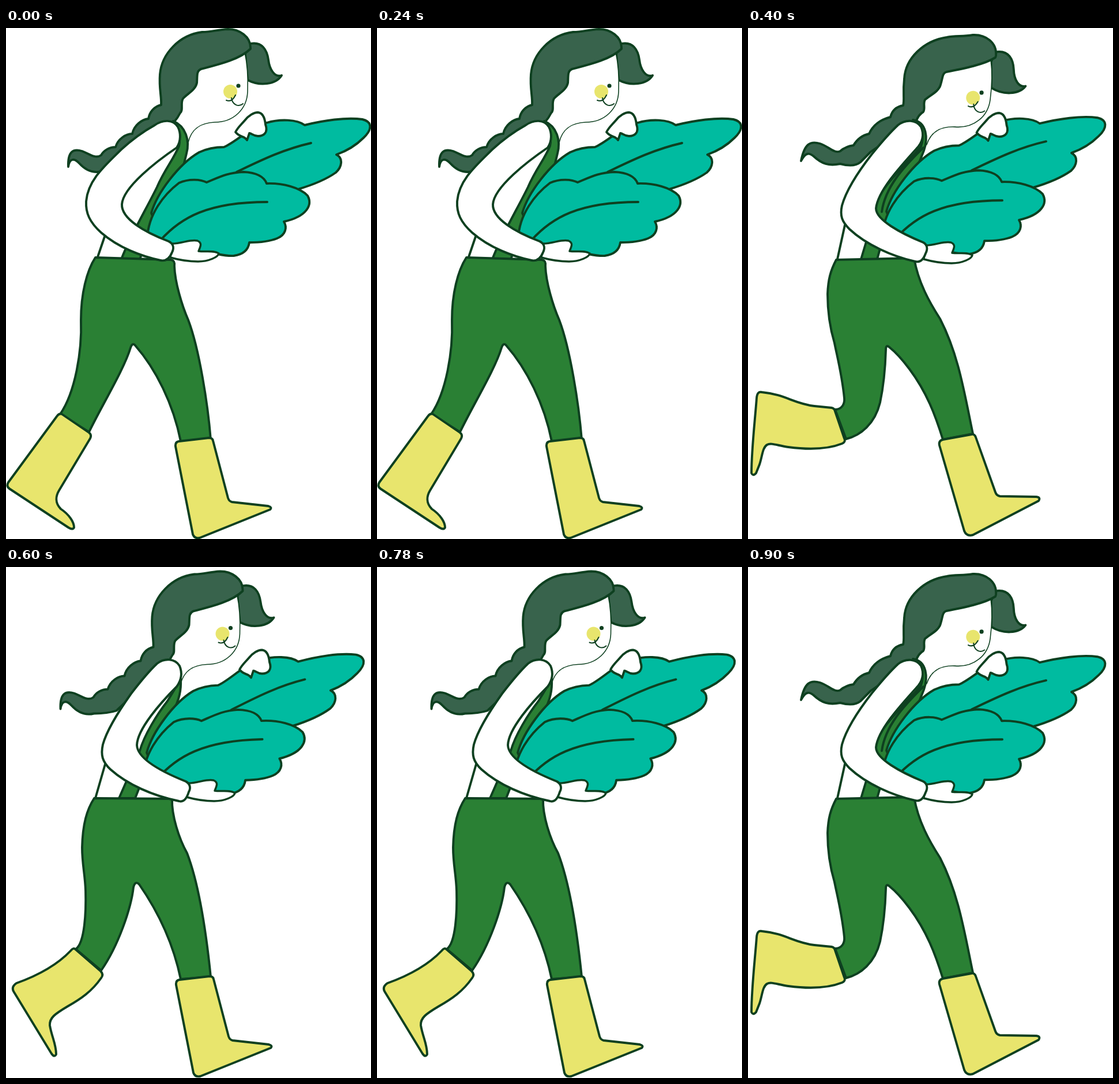
Recreate the animation shown at these times as an HTML page with a canvas. Size 633x884 px, loop 1100 ms.

```html
<!DOCTYPE html>
<html lang="en">
<head>
<meta charset="utf-8">
<title>Harvest walk</title>
<style>
html, body { margin: 0; width: 100%; height: 100%; overflow: hidden; background: #fff; }
canvas { display: block; width: 633px; height: 884px; }
</style>
</head>
<body>
<canvas id="stage" width="633" height="884"></canvas>
<script>
const ctx = document.getElementById('stage').getContext('2d');
const INK = '#0e4020', HAIR = '#38634c', GREEN = '#2a8034',
      LEAF = '#00bba0', YELLOW = '#e8e56d', WHITE = '#fff';

// Parts shared by every pose
const tail = 'M420 28 C445 21 453 40 455 55 C457 72 466 86 478 82 C468 98 440 101 419 90 L415 45 Z';
const face = 'M414 42 C418 60 420 85 419 110 C418 140 395 163 362 163 C340 164 322 172 316 198';
const nose = 'M382 125 Q392 129 398 116';
const smile = 'M391 121 C393 134 404 137 411 131';
const backLeaf = 'M252 320 C262 285 300 235 335 215 C350 208 365 206 378 206 C398 198 425 170 452 164 ' +
  'C475 157 505 158 518 168 C550 160 590 154 618 158 C635 162 636 175 620 190 C605 205 590 213 573 219 ' +
  'C585 225 583 240 572 250 C555 262 530 272 506 279 L400 300 L260 340 Z';
const backVein = 'M400 249 C440 230 480 210 529 199';
const frontLeaf = 'M245 365 C246 322 275 287 300 268 C318 260 338 262 348 267 C370 258 385 250 412 249 ' +
  'C435 250 448 258 452 269 C480 268 510 276 523 290 C532 306 522 326 482 335 C488 345 485 358 470 364 ' +
  'C455 370 437 371 422 371 C420 385 410 392 395 394 C380 395 365 390 355 389 L280 380 Z';
const frontVein = 'M268 367 C303 328 350 301 453 301';
const farHand = 'M398 180 C402 172 408 167 414 160 C421 151 430 146 437 146 C446 147 449 157 450 167 ' +
  'C455 181 447 187 437 187 C429 187 426 182 422 182 L418 194 C413 186 406 190 398 180 Z';
const nearHand = 'M288 373 C305 373 320 365 332 368 C341 372 337 378 334 386 C345 388 360 384 369 390 ' +
  'C368 396 352 404 333 404 C315 404 303 402 285 397 Z';

const hairLevel = 'M424 34 C424 15 405 2 385 2 C365 3 358 7 340 7 C300 12 270 45 267 80 ' +
  'C265 105 270 118 269 133 C257 136 249 145 247 157 C236 158 222 168 219 183 C208 183 194 192 190 206 ' +
  'C180 206 170 211 165 220 C155 227 145 218 132 213 C115 208 107 215 108 240 C110 226 118 224 127 234 ' +
  'C138 246 150 252 166 248 C182 248 196 246 205 243 L292 162 Q298 155 302 147 C308 142 302 130 307 122 ' +
  'C315 113 328 108 331 95 C332 82 330 75 338 71 C365 64 405 55 424 36 Z';
const hairTilted = 'M430 48 C432 25 412 11 390 12 C372 15 360 13 345 16 C305 22 273 52 271 88 ' +
  'C268 115 272 122 269 134 C258 136 250 142 247 154 C236 157 219 163 210 183 C201 185 190 191 183 203 ' +
  'C175 204 167 207 160 213 C150 218 140 205 125 200 C108 195 98 200 92 230 C100 214 107 216 114 222 ' +
  'C128 235 140 239 160 235 C175 239 188 238 195 232 L213 214 L292 160 Q296 150 304 145 ' +
  'C308 139 303 131 307 124 C316 116 331 110 334 98 C338 85 337 78 344 76 C375 70 410 63 429 51 Z';
const frontBoot = 'M300 715 L352 709 Q358 709 359 714 L385 813 Q387 819 392 820 L455 827 ' +
  'Q462 829 458 833 L336 882 Q327 884 324 876 L294 724 Q293 716 300 715 Z';

const stride = {
  head: [0, 0, 0], hairAt: [0, 0], hair: hairLevel,
  leavesAt: [0, 0], farAt: [0, 0], nearAt: [0, 0], bootAt: [0, 0],
  torso: 'M172 358 L158 399',
  strap: 'M290 161 C312 170 319 195 313 217 L304 254 L264 320 C246 350 240 380 232 400 L200 400 ' +
    'C215 360 245 310 262 275 C275 245 292 225 300 204 C303 190 300 172 290 161 Z',
  arm: 'M258 168 C272 158 290 158 298 171 C303 181 304 195 296 207 C262 230 203 275 201 305 ' +
    'C200 330 240 353 282 369 C290 373 292 380 288 388 C284 398 278 404 268 402 C235 395 195 380 165 354 ' +
    'C145 336 138 320 139 300 C142 262 175 235 200 210 C222 190 240 178 258 168 Z',
  pants: 'M155 397 L286 401 C291 402 293 405 292 412 C293 440 305 480 316 505 C335 555 350 650 355 712 ' +
    'L303 715 C290 650 260 590 224 549 C221 545 218 547 216 553 C205 590 165 655 144 699 L94 668 ' +
    'C120 630 132 560 130 505 C130 460 140 420 155 397 Z',
  backBoot: 'M97 668 L144 700 Q149 704 146 710 L92 800 C86 810 85 822 95 832 C110 842 118 855 118 864 ' +
    'Q116 869 108 864 L6 797 Q0 793 4 786 L88 672 Q92 666 97 668 Z',
  frontBoot
};

const run = {
  head: [12.3, -22.8, 5], hairAt: [0, 0], hair: hairTilted,
  leavesAt: [-12, -2.8], farAt: [-1.5, 1], nearAt: [20, 3], bootAt: [0, 0],
  torso: 'M168 341 L155 400',
  strap: 'M286 159 C311 163 312 192 305 212 L290 250 L246 320 L224 400 L196 400 L208 360 L215 320 ' +
    'C222 280 285 225 300 205 C306 190 302 170 286 159 Z',
  seam: 'M304 207 C270 240 238 275 232 318',
  arm: 'M260 168 C274 157 292 159 300 171 C306 184 303 198 292 209 C262 242 225 283 222 312 ' +
    'C222 332 265 355 304 371 C311 375 312 382 308 390 C304 401 299 406 290 404 C250 395 205 375 176 348 ' +
    'C163 335 159 325 163 307 C170 282 190 250 215 218 C232 197 245 182 260 168 Z',
  pants: 'M153 401 L288 398 C295 440 315 475 333 503 C365 565 375 630 390 702 L338 712 ' +
    'C325 670 310 630 280 590 C265 570 255 560 245 552 Q239 547 239 557 C238 590 236 615 229 648 ' +
    'C220 685 195 705 170 711 L151 660 C163 660 168 650 167 640 C163 600 155 570 150 545 ' +
    'C141 515 138 490 138 460 C139 435 143 420 153 401 Z',
  backBoot: 'M24 630 C65 634 80 650 115 654 L145 657 Q150 658 151 663 L167 710 Q170 716 163 719 ' +
    'C135 730 100 729 70 725 C50 722 40 717 33 721 C25 726 25 740 20 755 L14 770 Q9 776 6 770 ' +
    'C6 730 12 680 15 640 Q16 628 24 630 Z',
  frontBoot: 'M338 712 L388 703 Q393 702 395 708 L429 803 Q431 809 437 810 L500 811 Q508 812 504 818 ' +
    'L390 877 Q379 880 375 870 L332 722 Q330 714 338 712 Z'
};

const step = {
  head: [-13.5, 5.5, 0], hairAt: [-13.5, 5.5], hair: hairLevel,
  leavesAt: [-14.6, 6.6, -1.2], farAt: [7, -2.5], nearAt: [28, 1], bootAt: [1, -1],
  torso: 'M172 341 L155 400',
  strap: 'M303 194 C304 212 301 228 290 250 L256 318 L224 400 L196 400 L232 318 ' +
    'C240 290 262 255 280 232 Z',
  arm: 'M262 167 C275 157 293 158 301 171 C306 183 304 196 296 207 C268 235 228 280 227 308 ' +
    'C228 333 272 355 312 371 C319 375 321 382 317 389 C313 402 307 407 300 405 C255 396 210 376 181 350 ' +
    'C167 337 164 325 168 307 C175 282 195 250 217 219 C234 197 247 181 262 167 Z',
  pants: 'M153 400 L288 401 C287 430 300 470 314 495 C335 550 348 640 355 709 L303 713 ' +
    'C292 660 270 605 231 549 Q224 542 221 554 C217 590 195 655 165 698 L121 661 ' +
    'C137 650 139 595 138 560 C137 530 132 515 132 485 C133 445 140 420 153 400 Z',
  backBoot: 'M120 661 L164 699 Q170 705 165 711 C149 734 130 747 107 760 C85 773 75 780 76 793 ' +
    'C79 812 87 825 87 843 Q84 849 79 842 L13 734 Q9 726 18 720 C60 705 90 687 112 664 Q117 658 120 661 Z',
  frontBoot
};

function shape(d, fill, width = 3.9) {
  const path = new Path2D(d);
  if (fill) {
    ctx.fillStyle = fill;
    ctx.fill(path);
  }
  ctx.lineWidth = width;
  ctx.stroke(path);
}

function dot(x, y, r, color) {
  ctx.fillStyle = color;
  ctx.beginPath();
  ctx.arc(x, y, r, 0, Math.PI * 2);
  ctx.fill();
}

function placed([x, y, deg = 0], paint) {
  ctx.save();
  ctx.translate(x, y);
  ctx.rotate(deg * Math.PI / 180);
  paint();
  ctx.restore();
}

function draw(p) {
  ctx.fillStyle = WHITE;
  ctx.fillRect(0, 0, 633, 884);
  ctx.strokeStyle = INK;
  ctx.lineCap = ctx.lineJoin = 'round';

  placed(p.head, () => {
    shape(tail, HAIR);
    shape(face, WHITE, 1.6);
    dot(389, 110, 12, YELLOW);
    dot(403, 100, 3.6, INK);
    shape(nose, null, 2);
    shape(smile, null, 2);
  });
  placed(p.hairAt, () => shape(p.hair, HAIR));
  shape(p.torso);
  shape(p.strap, GREEN);
  if (p.seam) shape(p.seam);
  placed(p.leavesAt, () => {
    shape(backLeaf, LEAF);
    shape(backVein);
    shape(frontLeaf, LEAF);
    shape(frontVein);
  });
  placed(p.farAt, () => shape(farHand, WHITE));
  shape(p.pants, GREEN);
  shape(p.backBoot, YELLOW);
  placed(p.bootAt, () => shape(p.frontBoot, YELLOW));
  placed(p.nearAt, () => shape(nearHand, WHITE, 3.5));
  shape(p.arm, WHITE);
}

const LOOP = 1100;
const poseAt = t => t < 400 ? stride : t < 600 ? run : t < 900 ? step : run;

const start = performance.now();
function tick() {
  draw(poseAt((performance.now() - start) % LOOP));
  requestAnimationFrame(tick);
}
tick();
</script>
</body>
</html>
```
